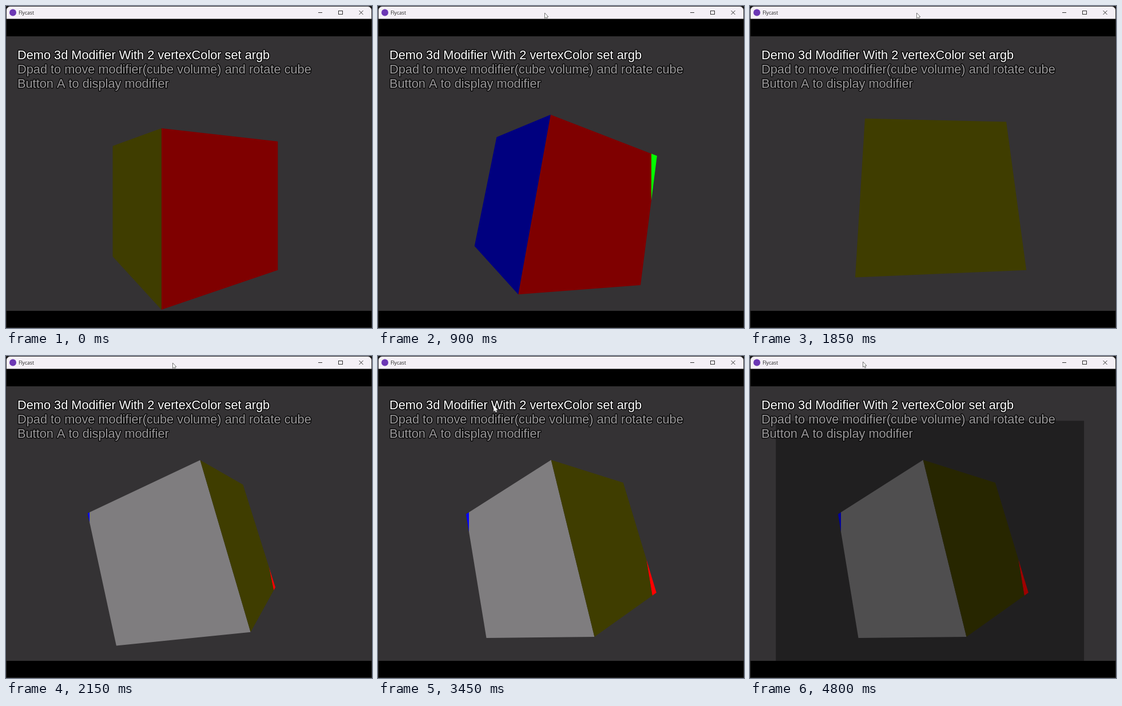
Animation, 640 px wide and 563 px high, one loop 5 s. Source, as an HTML page with a canvas:

```html
<!DOCTYPE html>
<html lang="en">
<head>
<meta charset="utf-8">
<title>Cube with modifier volume</title>
<style>
  html, body { margin: 0; width: 100%; height: 100%; overflow: hidden; background: #000; }
  canvas { display: block; }
</style>
</head>
<body>
<canvas id="stage" width="640" height="563"></canvas>
<script>
const ctx = document.getElementById('stage').getContext('2d');
const LOOP = 5000, STEP = 50;
const FOCAL = 240 / Math.tan(Math.PI / 6);
const CX = 320, CY = 293;
const CUBE = [0, 0.25, 2];
const HALF = 0.75;
const RAD = Math.PI / 180;

// Rows of [ms, value, ...], linear in between
const ROLL = [[350, 0], [550, 51.6], [825, 120], [1240, 17.2]];
const YAW = [[1240, 32.6], [1375, 7.1], [1850, 95.8], [2471, 214], [2550, 199.3], [2850, 141]];
const VOLUME = [[825, -0.05, 0.25, 2], [1240, -0.015, 0.25, 1.907]];
const POINTER = [[3100, 291, 12], [3400, 202, 87], [3650, 202, 87],
                 [4200, 202, 24], [4700, 196, 10], [4800, 197, 10]];
const SHOW_VOLUME = 3550;

// axis, sign, colour inside the volume, colour outside it
const FACES = [
  [2, -1, '#7f0000', '#00ff00'],
  [2, 1, '#7f7d7f', '#0000ff'],
  [0, -1, '#3f3d00', '#ff0000'],
  [0, 1, '#007f00', '#ffff00'],
  [1, 1, '#00007f', '#00a0a0'],
  [1, -1, '#007f7f', '#ff00ff']
];

const mix = (a, b, k) => a.map((v, i) => v + (b[i] - v) * k);

function track(keys, t) {
  if (t <= keys[0][0]) return keys[0].slice(1);
  for (let i = 1; i < keys.length; i++) {
    const a = keys[i - 1], b = keys[i];
    if (t <= b[0]) return mix(a, b, (t - a[0]) / (b[0] - a[0])).slice(1);
  }
  return keys[keys.length - 1].slice(1);
}

function rotate([x, y, z], roll, yaw) {
  const cr = Math.cos(roll), sr = Math.sin(roll);
  const cy = Math.cos(yaw), sy = Math.sin(yaw);
  const u = x * cr - y * sr;
  return [u * cy - z * sy, x * sr + y * cr, u * sy + z * cy];
}

const project = ([x, y, z]) => [CX + FOCAL * x / z, CY + FOCAL * y / z];

function fillPoly(points, colour) {
  if (points.length < 3) return;
  ctx.fillStyle = colour;
  ctx.beginPath();
  points.forEach(p => ctx.lineTo(...project(p)));
  ctx.fill();
}

// Cuts a polygon where dist changes sign
function split(points, dist) {
  const inside = [], outside = [];
  points.forEach((p, i) => {
    const q = points[(i + 1) % points.length];
    const a = dist(p), b = dist(q);
    (a <= 0 ? inside : outside).push(p);
    if ((a <= 0) !== (b <= 0)) {
      const m = mix(p, q, a / (a - b));
      inside.push(m);
      outside.push(m);
    }
  });
  return [inside, outside];
}

function faceCorners(axis, sign) {
  return [[-1, -1], [1, -1], [1, 1], [-1, 1]].map(([a, b]) => {
    const p = [a / 2, b / 2];
    p.splice(axis, 0, sign / 2);
    return p;
  });
}

function drawCube(t, volume) {
  const roll = track(ROLL, t)[0] * RAD, yaw = track(YAW, t)[0] * RAD;
  const place = p => rotate(p, roll, yaw).map((v, i) => v + CUBE[i]);
  for (const [axis, sign, dark, bright] of FACES) {
    const local = [0, 0, 0];
    local[axis] = sign;
    const n = rotate(local, roll, yaw);
    const facing = n.reduce((s, v, i) => s + v * CUBE[i], 0.5);
    if (facing >= 0) continue;
    let poly = faceCorners(axis, sign).map(place);
    for (let i = 0; i < 3; i++) {
      for (const side of [-1, 1]) {
        const [inside, outside] = split(poly, p => side * (p[i] - volume[i]) - HALF);
        fillPoly(outside, bright);
        poly = inside;
      }
    }
    fillPoly(poly, dark);
  }
}

function drawVolume([x, y, z]) {
  const near = z - HALF;
  const corners = [[-1, -1], [1, -1], [1, 1], [-1, 1]];
  fillPoly(corners.map(([a, b]) => [x + a * HALF, y + b * HALF, near]), 'rgba(0,0,0,0.38)');
}

function drawText() {
  ctx.font = '21.75px "Liberation Sans", Arial, sans-serif';
  ctx.lineJoin = 'round';
  ctx.lineWidth = 3;
  ctx.strokeStyle = '#0c0c0c';
  [
    ['Demo 3d Modifier With 2 vertexColor set argb', '#ffffff'],
    ['Dpad to move modifier(cube volume) and rotate cube', '#999799'],
    ['Button A to display modifier', '#999799']
  ].forEach(([text, colour], i) => {
    const x = 20, y = 93 + 25 * i;
    ctx.strokeText(text, x, y);
    ctx.fillStyle = colour;
    ctx.fillText(text, x, y);
  });
}

function drawTitleBar() {
  ctx.fillStyle = '#f4f0f6';
  ctx.beginPath();
  ctx.roundRect(1, 1, 638, 21.5, [6, 6, 0, 0]);
  ctx.fill();
  ctx.fillStyle = '#6c37b4';
  ctx.beginPath();
  ctx.arc(12, 11.5, 6, 0, 2 * Math.PI);
  ctx.fill();
  ctx.fillStyle = '#222';
  ctx.font = '8.6px "Open Sans", "Noto Sans", sans-serif';
  ctx.fillText('Flycast', 22, 15);
  ctx.strokeStyle = '#333';
  ctx.lineWidth = 1;
  ctx.strokeRect(581.5, 8.5, 7, 6);
  ctx.beginPath();
  ctx.moveTo(546, 11.5);
  ctx.lineTo(553, 11.5);
  ctx.moveTo(617.5, 8);
  ctx.lineTo(624.5, 15);
  ctx.moveTo(624.5, 8);
  ctx.lineTo(617.5, 15);
  ctx.stroke();
}

function drawPointer([x, y]) {
  ctx.save();
  ctx.translate(x + 0.5, y);
  ctx.beginPath();
  [[0, 0], [0, 9.5], [2, 7.8], [3.6, 11], [5, 10.3], [3.6, 7.2], [6.4, 7]]
    .forEach(p => ctx.lineTo(...p));
  ctx.closePath();
  ctx.fillStyle = '#fff';
  ctx.fill();
  ctx.lineWidth = 0.8;
  ctx.strokeStyle = y > 23 ? '#ddd' : '#555';
  ctx.stroke();
  ctx.restore();
}

function draw(t) {
  ctx.fillStyle = '#000';
  ctx.fillRect(0, 0, 640, 563);
  ctx.save();
  ctx.beginPath();
  ctx.rect(0, 53, 640, 480);
  ctx.clip();
  ctx.fillStyle = '#343234';
  ctx.fillRect(0, 53, 640, 480);
  const volume = track(VOLUME, t);
  drawCube(t, volume);
  if (t >= SHOW_VOLUME) drawVolume(volume);
  drawText();
  ctx.restore();
  ctx.strokeStyle = '#2c2c2c';
  ctx.lineWidth = 1;
  ctx.strokeRect(0.5, 0.5, 639, 562);
  drawTitleBar();
  if (t >= 100) drawPointer(track(POINTER, t));
}

function tick() {
  const t = performance.now() % LOOP;
  draw(Math.floor(t / STEP) * STEP);
  requestAnimationFrame(tick);
}
tick();
</script>
</body>
</html>
```
